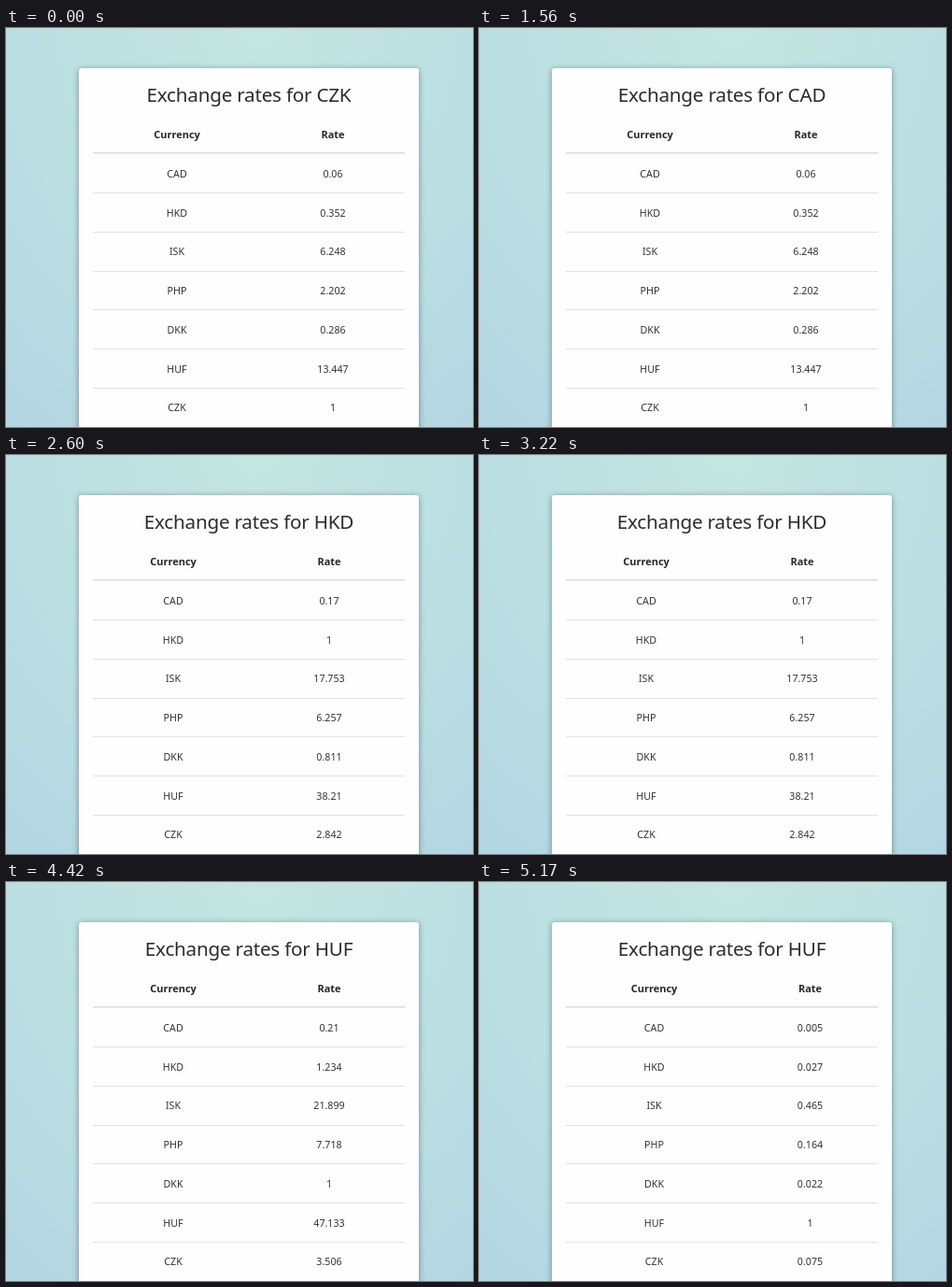
Recreate the animation shown at these times as an HTML page. Size 500x427 px, loop 5.59 s.

```html
<!DOCTYPE html>
<html lang="en">
<head>
<meta charset="utf-8">
<title>Exchange rates</title>
<style>
  html, body { margin: 0; height: 100%; overflow: hidden; }
  body { background: radial-gradient(ellipse 520px 620px at 270px -10px, #c4e6e0, #bbdfe2 48%, #b3d5e2 85%); }
  svg { display: block; width: 500px; height: 427px; }
  text { font: 10.7px "Noto Sans", "Open Sans", sans-serif; fill: #333; text-anchor: middle; }
  .title { font-size: 20.7px; letter-spacing: -.25px; fill: #2c2c2c; }
  .head { font-size: 11px; font-weight: bold; fill: #262626; }
  .card { fill: #fefefe; filter: drop-shadow(0 1px 3px rgba(0, 0, 0, .38)); }
  .rule { fill: #e3e3e3; }
  .rule.strong { fill: #dcdcdc; }
  .edge { fill: none; stroke: #c9d3d2; }
</style>
</head>
<body>
<svg viewBox="0 0 500 427"></svg>
<script>
const svg = document.querySelector("svg");
const LOOP = 5590, TOP = 134.4, ROW = 41.75;
const currencies = ["CAD", "HKD", "ISK", "PHP", "DKK", "HUF", "CZK"];

// x is the centre of the first column, which shifts with the table's width
const tables = {
  CZK: { x: 183, rates: "0.06 0.352 6.248 2.202 0.286 13.447 1" },
  CAD: { x: 175, rates: "1 5.896 104.662 36.887 4.78 225.267 16.753" },
  HKD: { x: 179, rates: "0.17 1 17.753 6.257 0.811 38.21 2.842" },
  DKK: { x: 179, rates: "0.21 1.234 21.899 7.718 1 47.133 3.506" },
  HUF: { x: 187.5, rates: "0.005 0.027 0.465 0.164 0.022 1 0.075" }
};

// [start in ms, currency in the title, table shown]
const steps = [
  [0, "CZK", "CZK"],
  [1560, "CAD", "CAD".replace("CAD", "CZK")],
  [1690, "CAD", "CAD"],
  [2600, "HKD", "HKD"],
  [3640, "DKK", "DKK"],
  [4420, "HUF", "DKK"],
  [4550, "HUF", "HUF"]
];

function add(tag, attributes, parent = svg) {
  const node = document.createElementNS("http://www.w3.org/2000/svg", tag);
  for (const key in attributes) node.setAttribute(key, attributes[key]);
  return parent.appendChild(node);
}

function label(x, y, className, content, parent) {
  const node = add("text", { x, y, class: className }, parent);
  node.textContent = content;
  return node;
}

add("path", { class: "edge", d: "M.5 427V.5H500" });
add("rect", { class: "card", x: 78, y: 43, width: 364, height: 420, rx: 3 });
const title = label(260, 79, "title", "");
add("rect", { class: "rule strong", x: 93, y: 133, width: 334, height: 1.5 });

const columns = add("g", {});
label(0, 118, "head", "Currency", columns);
label(167, 118, "head", "Rate", columns);
const rateLabels = currencies.map((code, i) => {
  const y = Math.round(TOP + ROW * i + 25.4);
  add("rect", { class: "rule", x: 93, y: Math.round(TOP + ROW * (i + 1)), width: 334, height: 1 });
  label(0, y, "cell", code, columns);
  return label(167, y, "cell", "", columns);
});

let shown;
function draw(now) {
  const time = now % LOOP;
  const step = steps.findLast(([start]) => time >= start);
  if (step !== shown) {
    shown = step;
    const { x, rates } = tables[step[2]];
    title.textContent = "Exchange rates for " + step[1];
    columns.setAttribute("transform", `translate(${x} 0)`);
    rates.split(" ").forEach((rate, i) => rateLabels[i].textContent = rate);
  }
  requestAnimationFrame(draw);
}
draw(performance.now());
</script>
</body>
</html>
```
